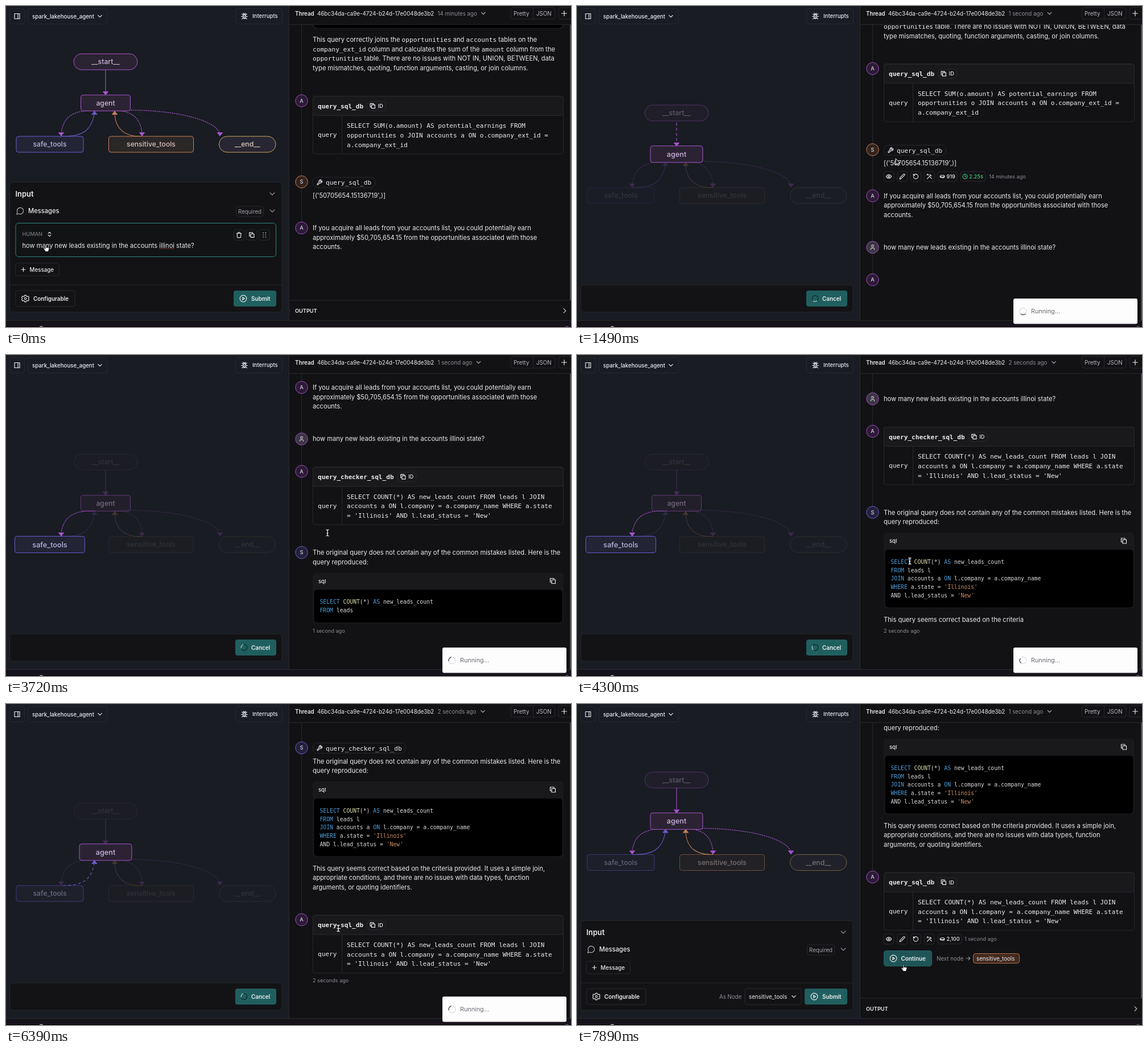
An HTML page for the animation above (8000 ms loop, 993x564 px).

```html
<!DOCTYPE html>
<html lang="en">
<head>
<meta charset="utf-8">
<title>Agent thread</title>
<style>
html, body { margin: 0; width: 100%; height: 100%; overflow: hidden; background: #121215; }
svg { display: block; width: 993px; height: 564px; font-family: Inter, sans-serif; }
.m { font-family: "DejaVu Sans Mono", monospace; }
</style>
</head>
<body>
<svg id="stage" viewBox="0 0 993 564"></svg>
<script>
const stage = document.getElementById('stage');
const LOOP = 8000, STEP = 148.87;
const INK = '#ececef', MUTED = '#8d8d94', LINE = '#29292e', TEAL = '#205f5f';
const PINK = '#a855cc', BLUE = '#6a5bcb', RUST = '#c47f55';
const BODY = 11.13, UI = 9.75, TINY = 9.1, ROW = 16.7;

const RING = 'M22 12a10 10 0 1 1-20 0 10 10 0 0 1 20 0z';
const ICON = {
  down: 'm6 9 6 6 6-6', right: 'm9 18 6-6-6-6', plus: 'M5 12h14M12 5v14', arrow: 'M4 12h16M13 5l7 7-7 7',
  updown: 'm7 15 5 5 5-5M7 9l5-5 5 5', panel: 'M3 3h18v18H3zM15 3v18',
  copy: 'M8 8h13v13H8zM16 8V3H3v13h5',
  trash: 'M3 6h18M19 6v14a2 2 0 0 1-2 2H7a2 2 0 0 1-2-2V6M8 6V4a2 2 0 0 1 2-2h4a2 2 0 0 1 2 2v2',
  grip: 'M7 4h1.5M7 12h1.5M7 20h1.5M16 4h1.5M16 12h1.5M16 20h1.5',
  eye: 'M2 12s3.5-7 10-7 10 7 10 7-3.5 7-10 7S2 12 2 12zM15 12a3 3 0 1 1-6 0 3 3 0 0 1 6 0z',
  pencil: 'M17 3a2.8 2.8 0 0 1 4 4L7.5 20.5 2 22l1.5-5.5z',
  redo: 'M3 12a9 9 0 1 0 9-9 9.75 9.75 0 0 0-6.74 2.74L3 8M3 3v5h5',
  tools: 'M4 21 18 7M14 4l6 6M5 3l5 5M15 14l6 6M3 7l4-4',
  wrench: 'M14.7 6.3a1 1 0 0 0 0 1.4l1.6 1.6a1 1 0 0 0 1.4 0l3.77-3.77a6 6 0 0 1-7.94 7.94l-6.91 6.91a2.12 2.12 0 0 1-3-3l6.91-6.91a6 6 0 0 1 7.94-7.94z',
  user: 'M19 21v-2a4 4 0 0 0-4-4H9a4 4 0 0 0-4 4v2M16 7a4 4 0 1 1-8 0 4 4 0 0 1 8 0z',
  clock: RING + 'M12 6v6l4 2', play: RING + 'M10 8l6 4-6 4z',
  token: 'M2 10a10 4 0 0 1 20 0v4a10 4 0 0 1-20 0zM2 10a10 4 0 0 0 20 0',
  bubble: 'M7.9 20A9 9 0 1 0 4 16.1L2 22z',
  bug: 'M8 11a4 4 0 0 1 8 0v5a4 4 0 0 1-8 0zM9 7a3 3 0 0 1 6 0M12 11v9M2 13h6M16 13h6M4 5l4 4M20 5l-4 4M4 21l4-4M20 21l-4-4M8 2l2 3M16 2l-2 3',
  gear: 'M15 12a3 3 0 1 1-6 0 3 3 0 0 1 6 0zM10 2h4l1 3 3 1 3-1 2 4-2 3 2 3-2 4-3-1-3 1-1 3h-4l-1-3-3-1-3 1-2-4 2-3-2-3 2-4 3 1 3-1z'
};

const lerp = (a, b, f) => a + (b - a) * f;
const clamp = f => Math.max(0, Math.min(1, f));
const at = (list, k) => list.filter(e => e[0] <= k).pop();

const text = (x, y, s, size = UI, fill = INK, more = '') =>
  `<text x="${x}" y="${y + size * .364}" font-size="${size}" fill="${fill}" ${more}>${s}</text>`;
const bold = (x, y, s, size = UI, w = 600, fill = INK) => text(x, y, s, size, fill, `font-weight="${w}"`);
const mono = (x, y, s, more = '') => text(x, y, s, 11.1, INK, 'class="m" ' + more);
const box = (x, y, x2, y2, r = 4, fill = 'none', stroke = LINE) =>
  `<rect x="${x}" y="${y}" width="${x2 - x}" height="${y2 - y}" rx="${r}" fill="${fill}" stroke="${stroke}"/>`;
const solid = (x, y, x2, y2, r, fill) => box(x, y, x2, y2, r, fill, 'none');
const path = (d, stroke, w = 1, more = '') => `<path d="${d}" fill="none" stroke="${stroke}" stroke-width="${w}" ${more}/>`;
const icon = (name, x, y, size = 12, color = INK) => {
  const z = size / 24;
  return path(ICON[name], color, 1.15 / z,
    `stroke-linecap="round" stroke-linejoin="round" transform="translate(${x - size / 2} ${y - size / 2}) scale(${z})"`);
};
const group = (inner, dy = 0, alpha = 1) => `<g transform="translate(0 ${dy})" opacity="${alpha}">${inner}</g>`;
const spinner = (x, y, r, track, arc, k) =>
  `<circle cx="${x}" cy="${y}" r="${r}" fill="none" stroke="${track}" stroke-width="1.4"/>` +
  path(`M0 ${-r}A${r} ${r} 0 0 1 ${r} 0`, arc, 1.4, `transform="translate(${x} ${y}) rotate(${k * 80 + 55})"`);

/* Graph */
const NODES = [
  ['__start__', 119, 231, 98, 14, PINK, '#2a2332'],
  ['agent', 131.5, 218.5, 170.3, 4, PINK, '#2b2333'],
  ['safe_tools', 18, 136, 243, 4, BLUE, '#232436'],
  ['sensitive_tools', 180.5, 329.5, 243, 4, RUST, '#2b2727'],
  ['__end__', 374.5, 474, 243, 14, '#cda362', '#272632']
];
// path, colour, arrow tip x, tip y, direction, dashed
const EDGES = [
  ['M175 112V150', PINK, 175, 157, 1, 0],
  ['M157 184C113 182 101 199 97 222', PINK, 97, 229, 1, 1],
  ['M97 229C138 230 150 216 155 191', BLUE, 155.5, 184, -1, 0],
  ['M190 184C223 183 236 199 239 222', PINK, 239, 229, 1, 1],
  ['M239 229C206 230 193 214 191 191', RUST, 191, 184, -1, 0],
  ['M200 183C290 181 363 198 375 222', PINK, 376, 229, 1, 1]
];
// first step, active node, active edge, node opacities, edge opacities
const STAGES = [
  [0, -1, -1, [1, 1, 1, 1, 1], [1, 1, 1, 1, 1, 1]],
  [3, 1, 0, [.4, 1, .14, .14, .14], [1, .25, .25, .25, .25, .25]],
  [17, 2, 1, [.13, .5, 1, .12, .12], [.3, 1, .22, .22, .25, .22]],
  [32, 1, 2, [.13, 1, .5, .12, .12], [.28, .25, 1, .22, .25, .22]],
  [46, 1, -1, [.4, 1, .45, .5, .5], [1, 1, 1, 1, 1, 1]]
];

function graph(k) {
  const now = at(STAGES, k), prev = STAGES[Math.max(0, STAGES.indexOf(now) - 1)];
  const f = clamp((k - now[0] + 1) / 2);
  const edges = EDGES.map(([d, color, x, y, dir, dashed], i) => {
    const live = now[2] === i;
    const dash = live && !dashed ? '5 4' : dashed ? '2.6 1.2' : 'none';
    const move = live ? -k * 3 : 0;
    return group(path(d, color, 1.1, `stroke-dasharray="${dash}" stroke-dashoffset="${move}"`) +
      `<path d="M${x} ${y}l-5.3 ${-7 * dir}h10.6z" fill="${color}"/>`, 0, lerp(prev[4][i], now[4][i], f));
  }).join('');
  const nodes = NODES.map(([name, x1, x2, y, r, color, fill], i) => {
    const live = now[1] === i, g = live ? 2.5 : 0;
    return group(box(x1 - g, y - 14 - g / 5, x2 + g, y + 14 + g / 5, r, fill, color) +
      text((x1 + x2) / 2, y, name, live ? 12.7 : 12.2, `color-mix(in srgb, ${color} 30%, #dcdce4)`,
        'text-anchor="middle" font-weight="500"'),
      0, lerp(prev[3][i], now[3][i], f));
  }).join('');
  return group(edges + nodes, k < 3 ? 0 : k < 46 ? 90 : 35.5);
}

/* Left column */
const button = (x, x2, label, name, fill) =>
  (fill ? solid(x, 500, x2, 528, 4, fill) : box(x, 500, x2, 528)) + icon(name, x + 17, 514, 14) +
  bold(x + 31, 514, label, 9.9);

function leftColumn(k) {
  const idle = k < 3, running = !idle && k < 46;
  let s = `<rect width="497" height="553" fill="#191c23"/>` + graph(k);
  s += box(6.5, 4.5, 32.5, 31.5) + icon('panel', 19.5, 18, 12) +
    box(38.5, 4.5, 178, 31.5) + bold(46, 18, 'spark_lakehouse_agent', 9.7, 500) + icon('down', 165, 18, 13) +
    box(403.5, 4.5, 485.5, 31.5) + icon('bug', 419, 18, 13) + bold(433, 18, 'Interrupts', 9.6, 500);
  s += box(6.5, idle ? 309.5 : running ? 490 : 380.5, 485, 538, 6, '#131316', '#26272d');
  if (running) return s + solid(403, 500, 475, 528, 4, TEAL) + spinner(418.5, 514, 5.3, '#0f3132', '#a5c6c5', k) + bold(431, 514, 'Cancel', 9.9);
  s += group(bold(16.5, 330, 'Input', 12.9) + icon('down', 468, 330, 16, MUTED) +
    icon('bubble', 25, 360, 15, '#b5b5bb') + bold(39, 360, 'Messages', BODY, 500) +
    box(404.5, 352, 452.5, 370) + text(408, 361, 'Required', UI, '#a2a2a8') + icon('down', 468, 360, 16, MUTED), idle ? 0 : 71);
  if (idle) {
    s += box(17, 381.5, 474.5, 440.5, 5, '#121315', '#2c857b') +
      bold(28.5, 401, 'HUMAN', 9.2, 500, '#77777d') + icon('updown', 76.5, 401, 11) +
      ['trash', 'copy', 'grip'].map((n, i) => box(400 + i * 22.3, 393, 419 + i * 22.3, 411.5) + icon(n, 409.5 + i * 22.3, 402.3, 11)).join('') +
      text(28.5, 420.5, ASK, BODY) + path('M270 426.5H297', '#c0484c', 1, 'stroke-dasharray="1.5 1.2"');
  } else {
    s += text(250, 514, 'As Node', UI, MUTED) + box(295, 500, 394, 528) + text(302, 514, 'sensitive_tools') + icon('down', 381, 514, 13);
  }
  return s + box(16.5, 452, 93.5, 474) + icon('plus', 30.5, 463, 12) + bold(41.5, 463, 'Message', UI, 500) +
    path('M7 490H485', LINE) + button(17, 121, 'Configurable', 'gear') + button(400, 475, 'Submit', 'play', TEAL);
}

/* Thread */
const ASK = 'how many new leads existing in the accounts illinoi state?';
const code = s => `<tspan class="m">${s}</tspan>`;
const INTRO = [
  `This query correctly joins the ${code('opportunities')} and ${code('accounts')} tables on the`,
  `${code('company_ext_id')} column and calculates the sum of the ${code('amount')} column from the`,
  `${code('opportunities')} table. There are no issues with NOT IN, UNION, BETWEEN, data`,
  'type mismatches, quoting, function arguments, casting, or join columns.'
];
const SUM_SQL = ['SELECT SUM(o.amount) AS potential_earnings FROM', 'opportunities o JOIN accounts a ON o.company_ext_id =', 'a.company_ext_id'];
const COUNT_SQL = ['SELECT COUNT(*) AS new_leads_count FROM leads l JOIN', 'accounts a ON l.company = a.company_name WHERE a.state', "= 'Illinois' AND l.lead_status = 'New'"];
const ANSWER = [
  'If you acquire all leads from your accounts list, you could potentially earn',
  'approximately $50,705,654.15 from the opportunities associated with those', 'accounts.'
];
const CHECK = ['The original query does not contain any of the common mistakes listed. Here is the', 'query reproduced:'];
const BLOCK = ['SELECT COUNT(*) AS new_leads_count', 'FROM leads l', 'JOIN accounts a ON l.company = a.company_name', "WHERE a.state = 'Illinois'", "AND l.lead_status = 'New'"];
const VERDICT = [
  'This query seems correct based on the criteria provided. It uses a simple join,',
  'appropriate conditions, and there are no issues with data types, function', 'arguments, or quoting identifiers.'
];
const count = lines => lines.join('').length;
const cut = (lines, n) => lines.map(l => { const part = l.slice(0, Math.max(0, n)); n -= l.length; return part; }).filter(Boolean);
const lines = (arr, y) => arr.map((s, i) => text(539, y + i * ROW, s, BODY)).join('');
const stamp = (y, s, x = 539) => text(x, y, s, TINY, MUTED);

const avatar = (y, letter, stroke, fill) =>
  `<circle cx="519.5" cy="${y}" r="10.7" fill="${fill}" stroke="${stroke}"/>` +
  (letter ? text(519.5, y, letter, TINY, '#d6cfe0', 'text-anchor="middle" font-weight="500"') : icon('user', 519.5, y, 11, '#c9bdd2'));
const agent = y => avatar(y, 'A', '#9a4fb8', '#2d1a37');

const cardHeight = rows => 51.2 + Math.max(1, rows.length) * ROW;
function card(y, title, rows) {
  const h = cardHeight(rows), end = 548 + title.length * 6.69, mid = y + 34 + (h - 34) / 2;
  return box(539.5, y, 979.5, y + 34, 4, '#19191c') + box(539.5, y, 979.5, y + h) +
    path(`M590.5 ${y + 34}V${y + h}`, LINE) +
    mono(548, y + 17, title, 'font-weight="600"') + box(end + 6, y + 9, end + 39.5, y + 25.5, 7) +
    icon('copy', end + 16, y + 17, 11) + bold(end + 25.5, y + 17, 'ID', TINY, 500) +
    mono(548, mid, 'query') + rows.map((s, i) => mono(599, y + 51.7 + i * ROW, s)).join('');
}
const chip = (y, title) => box(539.5, y - 9, 568.5 + title.length * 6.69, y + 9, 7) + icon('wrench', 551, y, 11) + mono(562, y, title);

const COLORS = [[/^'/, '#d08f66'], [/^COUNT/, '#dcdcaa'], [/./, '#4e9fdc']];
const paint = s => s.replace(/'[^']*'?|\b(SELECT|FROM|JOIN|ON|WHERE|AS|COUNT)\b/g,
  w => `<tspan fill="${COLORS.find(c => c[0].test(w))[1]}">${w}</tspan>`);
const blockHeight = rows => 133 - (5 - rows.length) * 14.65;
function codeBlock(y, rows) {
  const h = blockHeight(rows);
  return solid(539, y, 980, y + h, 5, '#19191c') + solid(541.5, y + 30, 977.5, y + h - 1.5, 5, '#000') +
    bold(549, y + 15, 'sql', 9.5, 500) + icon('copy', 961, y + 14.5, 12) +
    rows.map((s, i) => text(551.5, y + 51.5 + i * 14.65, paint(s), 9.74, '#dcdce0', 'class="m"')).join('');
}

function toolbar(y, age, tokens, time) {
  const names = ['eye', 'pencil', 'redo'].concat(tokens ? 'tools' : []);
  let s = names.map((n, i) => box(539 + i * 23.7, y - 9, 557 + i * 23.7, y + 9) + icon(n, 548 + i * 23.7, y, 11)).join('');
  if (!tokens) return s + stamp(y, age, 610);
  const end = tokens.length > 3 ? 676 : 668;
  s += box(634, y - 8.5, end, y + 8.5) + icon('token', 642, y, 9) + bold(649.5, y, tokens, TINY, 500);
  if (time) s += box(674, y - 8.5, 718, y + 8.5) + icon('clock', 682, y, 9.5, '#45c97b') + bold(689, y, time, 9.3, 500, '#45c97b');
  return s + stamp(y, age, time ? 724 : 681);
}

function thread(k) {
  const first = cut(COUNT_SQL, (k - 11) * 40), second = cut(COUNT_SQL, (k - 39) * 50);
  const done = k >= 32, n = done ? 999 : 36 * (k - 21);
  const intro = cut(CHECK, n), sql = cut(BLOCK, n - count(CHECK)), after = cut(VERDICT, n - count(CHECK) - count(BLOCK));
  const old = '14 minutes ago', lift = done ? 23.5 : 0, blockY = 715.5 + lift;
  const lastRow = k < 3 ? 390 : k < 17 ? 537.5 : k < 32 ? 680 : 982;
  let scroll = k < 3 ? 0 : 56.5;

  let s = path(`M519.5 0V${lastRow}`, LINE) +
    solid(539, 0, 980, 40, 5, '#19191c') + solid(541.5, 0, 977.5, 38.5, 5, '#000') + lines(INTRO, 59) +
    agent(166.5) + card(158.5, 'query_sql_db', SUM_SQL) +
    avatar(309, 'S', RUST, '#33241d') + chip(310, 'query_sql_db') + text(539, 332.5, "[('50705654.15136719',)]", BODY) +
    agent(390) + lines(ANSWER, 390);
  if (k >= 6 && k < 12) s += toolbar(356, old, '919', '2.25s');
  if (k >= 12 && k < 19) s += group(toolbar(446, old, '919', '2.25s'), 0, k < 17 ? 1 : .3);
  if (k >= 3) s += avatar(480.5, '', '#9a4fb8', '#3b3643') + text(539, 480.5, ASK, BODY) + agent(537.5);
  if (k >= 17 && k < 21) s += toolbar(502.8, '3 seconds ago');
  if (k >= 12) {
    s += card(530, 'query_checker_sql_db', first);
    const end = 543 + cardHeight(first);
    if (k < 17) s += stamp(end, '1 second ago');
    scroll = k < 17 ? end - 484.5 : 199;
  }
  if (k >= 17) s += avatar(680, 'S', BLUE, '#23213a');
  if (k > 21) {
    if (done) s += chip(680.5, 'query_checker_sql_db');
    s += lines(intro, 680 + lift);
    if (sql.length) s += codeBlock(blockY, sql);
    s += lines(after, blockY + 152.5);
    const end = after.length ? blockY + 152.5 + (after.length - 1) * ROW + 20
      : sql.length ? blockY + blockHeight(sql) + 13 : 680 + (intro.length - 1) * ROW + 20;
    if (!done) s += stamp(end, k < 23 ? 'now' : k < 28 ? '1 second ago' : '2 seconds ago');
    scroll = done ? 501 : Math.max(199, end - 484.5);
  }
  if (done) s += agent(982);
  if (done && k < 40) s += toolbar(948, k < 34 ? 'now' : '1 second ago');
  if (k >= 40) {
    s += card(974.3, 'query_sql_db', second);
    const end = 987 + cardHeight(second);
    if (k < 46) s += stamp(end, k < 42 ? '1 second ago' : '2 seconds ago');
    scroll = k < 46 ? end - 485.3 : lerp(603, 678, clamp((k - 46) / 4));
  }
  if (k >= 46) {
    s += toolbar(1091, k < 51 ? 'now' : '1 second ago', '2,100') +
      box(539.5, 1111.5, 623.5, 1138.5, 4, '#1f5557', '#246163') + icon('play', 556, 1125, 14) + bold(569.5, 1125, 'Continue', 9.9) +
      text(632, 1125, 'Next node', UI, MUTED) + icon('arrow', 687.5, 1125, 10, MUTED) +
      box(696.5, 1116.5, 777.5, 1133.5, 4, '#43291f', '#b0714c') + text(702, 1125, 'sensitive_tools');
  }
  return group(s, -scroll);
}

// first step, label, chevron position
const NOW = ['now', 789], ONE = ['1 second ago', 830.5], TWO = ['2 seconds ago', 838];
const AGES = [[0, '14 minutes ago', 839], [4, ...NOW], [9, ...ONE], [15, ...TWO], [17, ...NOW], [21, ...ONE],
  [27, ...TWO], [32, ...NOW], [34, ...ONE], [40, ...TWO], [46, ...NOW], [51, ...ONE]];

function rightColumn(k) {
  const open = k < 3 || k >= 46, [, age, chev] = at(AGES, k);
  let s = `<rect x="497" width="496" height="553" fill="#121215"/>` +
    `<svg x="497" y="33" width="496" height="519" viewBox="497 33 496 519">${thread(k)}</svg>` +
    `<rect x="991" y="33" width="2" height="${open ? 484 : 519}" fill="#47474c"/>`;
  if (open) s += `<rect x="497" y="517" width="496" height="35" fill="#121215"/>` + path('M497 517H993', LINE) +
    bold(508, 535.5, 'OUTPUT', 9.2) + icon('right', 982, 535.5, 15, '#b5b5bb');
  s += path('M497 32.5H993M497.5 0V552', LINE) + bold(508, 13, 'Thread') +
    text(547, 13, '46bc34da-ca9e-4724-b24d-17e0048de3b2') + text(758.5, 13, age, UI, MUTED) + icon('down', chev, 13, 13, '#b5b5bb') +
    box(887, 3, 965, 23) + path('M926.5 3V23', LINE) + text(892, 13, 'Pretty', UI, '#b9b9bf') + text(932, 13, 'JSON', UI, '#b9b9bf') +
    box(971, 3, 998, 23) + icon('plus', 981, 13, 15);
  return s;
}

const footer = () => `<rect y="552" width="993" height="12" fill="#15141a"/>` + path('M0 552.5H993', LINE) +
  `<rect y="562" width="993" height="2" fill="#08060a"/>` + path('M0 561.5H993', '#2b1830') +
  `<circle cx="62" cy="568" r="5.5" fill="#c9c4cc"/><circle cx="986" cy="568" r="5.5" fill="#6d4a72"/>`;

const toast = k => k < 4 || k >= 46 ? '' : group(solid(767, 514, 985, 558.5, 3, '#fdfdfe') +
  spinner(784, 536.5, 6, '#e0e0e3', '#55555b', k) + text(798, 536.5, 'Running...', 10.8, '#6c6c73'), 0, k < 5 ? .6 : 1);

/* Pointer */
const TRAIL = [[0, 71, 426], [2, 432, 514], [4, 437, 514], [9, 560, 273], [16, 560, 276], [18, 560, 282], [24, 560, 300],
  [29, 585, 362], [35, 585, 404], [39, 585, 404], [43, 584, 394], [47, 584, 396], [51, 575, 464], [54, 575, 464]];
const SHAPES = {
  hand: ['M-2-5.5v6l-1.5-1.2c-1.2-.6-1.8.4-1.2 1.2L-1.5 5.5h4.8L5-.2C5-1.6 3.5-1.8 3.3-.8 3.3-2 1.7-2.2 1.5-1.2 1.4-2.3 0-2.3-.2-1.4v-4.1c0-1.1-1.8-1.1-1.8 0z', '#fff', '#17171a', .9],
  arrow: ['M0-5.5V5.5L2.6 3.2 4.3 7 6.2 6.2 4.5 2.5H8z', '#121214', '#f2f2f4', 1],
  beam: ['M-2.5-5.5Q0-5.5 0-4V4Q0 5.5-2.5 5.5M2.5-5.5Q0-5.5 0-4V4Q0 5.5 2.5 5.5M-1.3.8H1.3', 'none', '#f2f2f4', 1.3]
};
const POINTER = [[0, 'hand'], [5, 'arrow'], [17, 'beam'], [32, 'arrow'], [40, 'beam'], [50, 'hand']];

function pointer(k) {
  const i = TRAIL.findIndex(p => p[0] > k), [a, x1, y1] = TRAIL[i - 1], [b, x2, y2] = TRAIL[i];
  const f = (k - a) / (b - a), [d, fill, stroke, w] = SHAPES[at(POINTER, k)[1]];
  return `<path d="${d}" fill="${fill}" stroke="${stroke}" stroke-width="${w}" stroke-linejoin="round" transform="translate(${lerp(x1, x2, f)} ${lerp(y1, y2, f)})"/>`;
}

let shown = -1;
const start = performance.now();
function draw() {
  const k = Math.floor(((performance.now() - start) % LOOP + 20) / STEP);
  if (k !== shown) {
    shown = k;
    stage.innerHTML = leftColumn(k) + rightColumn(k) + footer() + toast(k) + pointer(k);
  }
  requestAnimationFrame(draw);
}
draw();
</script>
</body>
</html>
```
